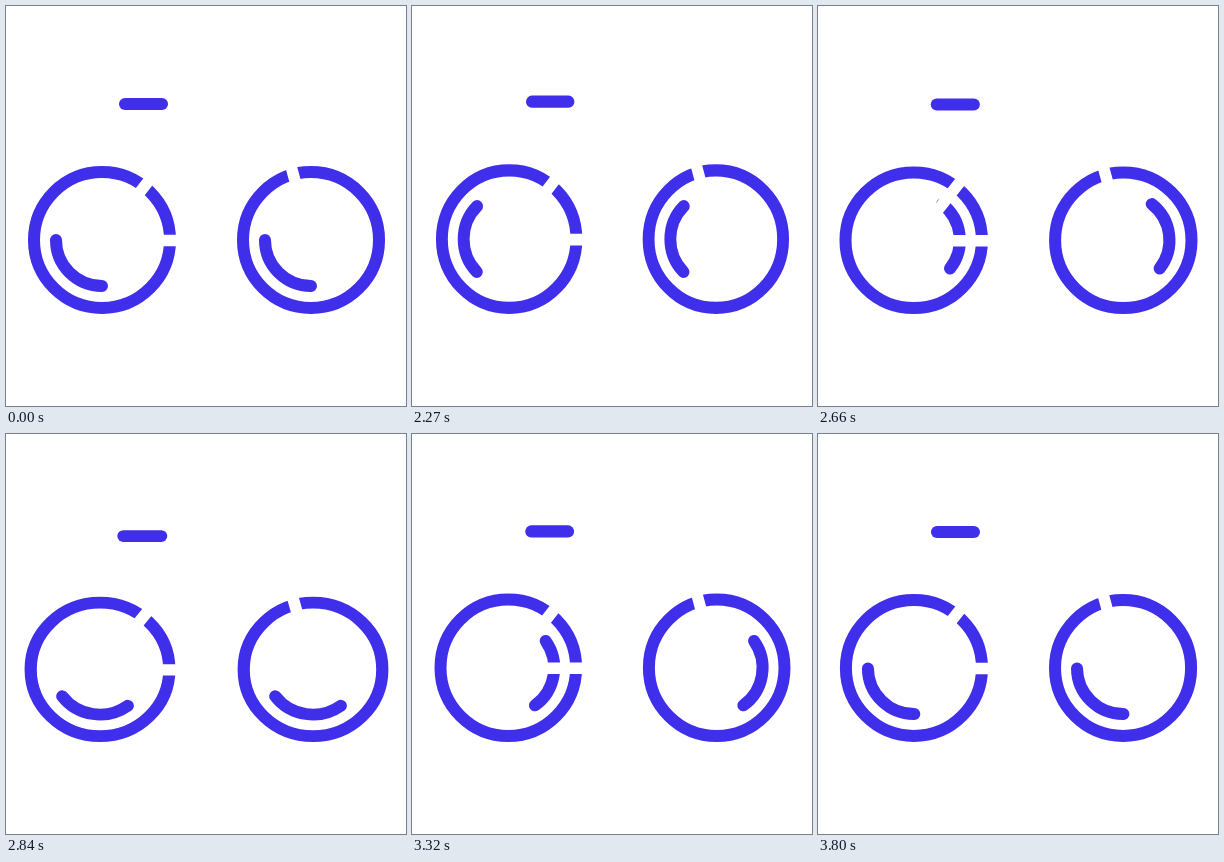
Recreate the animation shown at these times as an HTML page. Size 400x400 px, loop 3.83 s.

```html
<!DOCTYPE html>
<html lang="en">
<head>
<meta charset="utf-8">
<title>Bicycle</title>
<style>
  html, body { margin: 0; width: 100%; height: 100%; overflow: hidden; background: #fff; }
  svg { display: block; width: 100vw; height: 100vh; }
  .ink { fill: none; stroke: #3f2eea; stroke-width: 12; stroke-linecap: round; }
  .tubes { fill: none; stroke: #fff; stroke-width: 11.5; stroke-linejoin: round; }
</style>
</head>
<body>
<svg viewBox="0 0 400 400">
  <defs>
    <g id="wheel"><circle r="68"/></g>
  </defs>
  <g id="bike">
    <g class="ink">
      <path d="M119 98H156"/>
      <g transform="translate(96 234)">
        <circle r="68"/>
        <path class="shine" d="M-46 0A46 46 0 0 0 0 46"/>
      </g>
      <g transform="translate(305 234)">
        <circle r="68"/>
        <path class="shine" d="M-46 0A46 46 0 0 0 0 46"/>
      </g>
    </g>
    <path class="tubes" d="M170 140L96 234.5H205M305 234L272 112"/>
  </g>
</svg>
<script>
  const LOOP = 3830, REST = 2030, STEP = 30;
  const BASE_X = 200.5, BASE_Y = 308;
  // [step, vertical stretch]
  const STRETCH = [[0, 0], [15, .02], [26, -.02], [37.2, .02], [50, -.02], [60, 0]];

  const bike = document.getElementById('bike');
  const shines = document.querySelectorAll('.shine');
  const ease = p => (1 - Math.cos(Math.PI * p)) / 2;

  function stretchAt(n) {
    const i = STRETCH.findIndex(key => key[0] > n);
    const [n0, a] = STRETCH[i - 1], [n1, b] = STRETCH[i];
    return a + (b - a) * ease((n - n0) / (n1 - n0));
  }

  function draw(now) {
    const t = now % LOOP;
    let turn = 0, s = 0;
    if (t >= REST) {
      const n = Math.floor((t - REST) / STEP);
      turn = 720 * ease((n + 2) / 62);
      s = stretchAt(n);
    }
    bike.setAttribute('transform',
      `translate(${BASE_X} ${BASE_Y}) scale(${1 - s} ${1 + s}) translate(${-BASE_X} ${-BASE_Y})`);
    shines.forEach(el => el.setAttribute('transform', `rotate(${turn})`));
  }

  const start = performance.now();
  function tick() {
    draw(performance.now() - start);
    requestAnimationFrame(tick);
  }
  tick();
</script>
</body>
</html>
```
